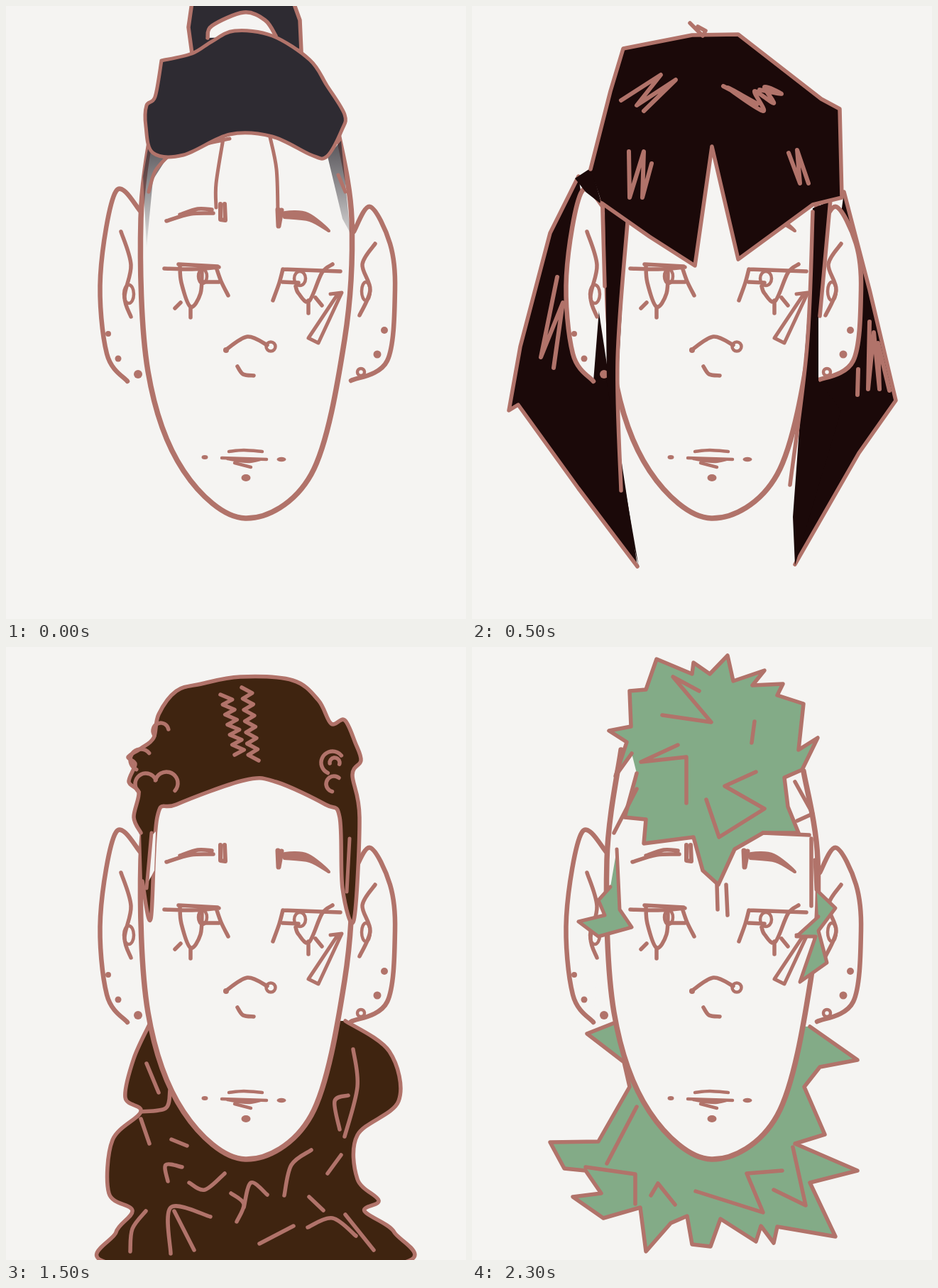
An HTML page with a canvas that plays this animation: 648x864 px, repeating every 2500 ms.

```html
<!DOCTYPE html>
<html lang="en">
<head>
<meta charset="utf-8">
<title>Five hairstyles</title>
<style>
html, body { margin: 0; width: 100%; height: 100%; overflow: hidden; background: #f5f4f2; }
canvas { display: block; }
</style>
</head>
<body>
<canvas width="648" height="864"></canvas>
<script>
const ctx = document.querySelector('canvas').getContext('2d');
const PAPER = '#f5f4f2', LINE = '#b1736a', HOLD = 500;

// Strokes are written as "x y x y ..." with "/" between separate strokes.
const parse = text => text.split('/').map(part => {
  const n = part.trim().split(/\s+/).map(Number);
  return n.flatMap((v, i) => i % 2 ? [] : [[v, n[i + 1]]]);
});

function trace(text, smooth) {
  const path = new Path2D();
  for (const p of parse(text)) {
    path.moveTo(...p[0]);
    for (let i = 1; i < p.length; i++) {
      const b = p[i - 1], c = p[i], a = p[i - 2] || b, d = p[i + 1] || c;
      if (smooth) path.bezierCurveTo(b[0] + (c[0] - a[0]) / 6, b[1] + (c[1] - a[1]) / 6,
        c[0] - (d[0] - b[0]) / 6, c[1] - (d[1] - b[1]) / 6, ...c);
      else path.lineTo(...c);
    }
  }
  return path;
}

function stroke(path, width = 5.5) {
  ctx.strokeStyle = LINE;
  ctx.lineWidth = width;
  ctx.stroke(path);
}
const curve = (text, width) => stroke(trace(text, true), width);
const angular = (text, width) => stroke(trace(text), width);

function fill(text, color, smooth) {
  ctx.fillStyle = color;
  ctx.fill(trace(text, smooth));
}

function shape(text, color, smooth, width) {
  fill(text, color, smooth);
  stroke(trace(text, smooth), width);
}

function dot(x, y, rx, ry = rx) {
  ctx.fillStyle = LINE;
  ctx.beginPath();
  ctx.ellipse(x, y, rx, ry, 0, 0, 7);
  ctx.fill();
}

function ring(x, y, rx, ry = rx) {
  const path = new Path2D();
  path.ellipse(x, y, rx, ry, 0, 0, 7);
  stroke(path, 4.5);
}

function curl(x, y, r, turn) {
  const path = new Path2D();
  path.arc(x, y, r, turn, turn + 3.6);
  stroke(path);
}

function zigzag(x, y, dx, dy, swing, turns) {
  const path = new Path2D();
  for (let i = 0; i <= turns; i++) {
    path.lineTo(x + dx * i / turns + (i % 2) * swing, y + dy * i / turns);
  }
  stroke(path);
}

const HEAD = '210 145 190 300 200 515 250 655 337 722 430 660 477 470 487 300 467 175';
const EARS = `190 290 155 261 133 380 142 490 171 529 /
  490 318 513 283 541 335 548 400 537 500 486 528`;

function face() {
  fill(EARS, PAPER, true);
  fill(HEAD, PAPER, true);
  curve(HEAD, 7.5);
  curve(EARS, 6.5);
  curve('162 318 176 365 167 410 176 438 / 520 335 502 364 513 400 498 436');
  ring(173, 406, 7, 13);
  ring(507, 402, 6, 13);
  dot(144, 462, 4); dot(158, 497, 4.5); dot(186, 519, 6);
  dot(533, 457, 5); dot(523, 491, 5.5); ring(500, 516, 5);

  // brows
  curve('226 303 260 293 292 292 / 245 294 270 286 290 287');
  angular('302 279 302 301 309 302 308 279', 6);
  angular('383 287 384 310 388 288', 7);
  shape('392 298 393 291 425 293 455 317 428 302 392 298', LINE, true, 4);

  // eyes
  curve(`223 370 262 371 300 368 / 243 364 298 367 / 245 365 247 390 260 424 274 405 276 372 /
    277 389 300 389 / 296 368 303 388 313 408 / 246 418 238 426 / 260 425 260 439`);
  curve(`390 371 471 374 / 390 371 385 390 376 415 / 390 389 412 390 /
    408 395 412 405 427 416 445 376 460 364 / 426 415 426 433 / 436 411 445 422`);
  ring(277, 381, 6, 10);
  ring(414, 384, 8, 10);
  angular('457 406 473 404 440 475 426 468 466 408', 5);

  // nose and mouth
  curve('309 485 340 466 368 478 / 326 508 334 519 349 521');
  dot(310, 485, 4);
  ring(373, 480, 6.5);
  curve('314 628 335 626 361 628 / 304 637 367 639 / 312 638 340 642 358 639 / 322 644 345 650', 4.5);
  dot(280, 636, 4.5, 3); dot(388, 639, 6.5, 3.2); dot(338, 665, 6.5, 5);
}

function shade(text) {
  const gradient = ctx.createLinearGradient(0, 190, 0, 340);
  ['cc', '73', '14'].forEach((alpha, i) => gradient.addColorStop(i / 2, '#2e2b32' + alpha));
  fill(text, gradient);
}

const topKnot = {
  color: '#2e2b32',
  front() {
    shade('202 190 228 212 207 245 198 340 193 240');
    shade('453 212 472 190 485 320 474 300');
    shape('262 -5 257 30 262 67 345 40 416 64 414 20 405 -5', this.color);
    shape('284 45 290 28 335 9 365 20 380 42', PAPER, true);
    curve(`306 187 296 250 296 284 / 372 185 381 230 383 290 /
      228 212 210 233 201 262 / 468 238 478 262 / 250 207 275 196 315 187`, 5);
    shape(`219 77 262 67 290 50 322 35 375 42 428 76 452 112 477 153 473 175 452 212 430 210
      375 184 315 181 250 210 207 207 197 170 198 140 210 128 219 77`, this.color, true, 5);
  }
};

const bob = {
  color: '#1b0909',
  back() {
    shape('150 240 110 320 68 480 52 570 65 562 150 680 233 790', this.color);
    shape('524 262 560 400 597 556 545 630 455 787', this.color);
  },
  front() {
    fill('187 280 218 305 206 520 210 683 235 791 190 532', this.color);
    fill('480 285 505 275 488 440 488 528 520 570 455 788 452 720 474 420', this.color);
    fill('183 280 160 262 145 243 168 228', this.color);
    curve(`183 255 187 395 / 219 305 205 500 210 683 /
      480 290 472 480 448 675 / 507 250 498 350 490 437`);
    shape(`167 230 195 120 213 60 310 41 375 40 492 131 518 145 521 270 480 280
      375 357 338 198 314 366 250 325 183 278`, this.color);
    angular('307 24 325 42 329 35 318 29');
    angular(`210 133 266 97 232 140 287 104 242 148 / 221 205 222 270 242 205 240 270 253 222 /
      446 207 462 250 458 203 474 250 / 120 382 97 495 128 418 115 510 / 544 512 543 548 /
      560 445 558 540 566 460 574 540 572 475 588 542`, 6);
    curve('354 113 402 138 360 115 410 148 398 120 425 137 412 114 436 124 405 118', 6);
  }
};

const spiky = {
  color: '#d2b19b',
  back() {
    shape('207 597 196 562 166 578 197 532', this.color);
    shape('476 535 509 595 466 571 473 598', this.color);
  },
  front() {
    shape('188 322 188 308 165 298 190 283', this.color);
    shape(`140 241 180 238 143 188 181 177 176 135 216 120 210 65 258 42 288 45 285 18 328 40 337 18
      335 52 387 30 390 65 406 77 460 88 470 152 523 170 510 228 545 227 524 242 521 262 494 288
      500 320 475 350 483 285 480 262 460 283 457 235 438 222 403 248 403 215 340 205 317 190
      347 274 300 192 250 230 248 200 216 240 213 270 180 285`, this.color);
    angular('487 340 500 350 488 362');
  }
};

const curly = {
  color: '#3f2410',
  back() {
    shape(`203 530 180 580 168 635 190 655 150 695 145 770 178 794 155 825 158 870 545 870 547 825
      505 795 525 780 495 750 495 688 553 640 540 570 478 527`, this.color, true);
    curve(`198 587 215 628 / 231 625 225 650 190 655 / 190 665 202 700 / 233 694 255 703 /
      228 753 225 730 248 733 / 258 755 280 765 308 742 / 392 773 402 730 430 709 / 453 742 472 716 /
      489 567 495 620 477 690 / 482 632 463 640 470 680`);
    curve(`317 770 335 785 325 810 / 335 790 345 755 368 772 / 197 795 178 820 175 852 /
      232 855 232 790 288 803 / 237 795 265 850 / 357 841 405 816 / 425 818 460 805 493 830 /
      427 775 447 794 / 478 800 518 850`);
  },
  front() {
    shape(`190 262 180 240 187 205 173 190 182 165 172 155 190 143 208 128 215 95 240 62 275 52 330 42
      404 47 440 75 458 108 477 103 492 135 500 160 488 180 498 240 490 385 474 340 470 240 450 222
      380 190 335 188 240 222 213 240 204 383 192 330`, this.color, true);
    fill('201 330 203 268 211 260 209 315', PAPER);
    curve('198 340 205 262 / 480 345 484 270', 5);
    curl(218, 118, 11, 2.5);
    curl(190, 159, 15, 2);
    curl(197, 193, 15, 2.3);
    curl(226, 192, 16, 3.4);
    curl(460, 163, 16, 2);
    curl(463, 163, 7, 3);
    curl(462, 193, 11, 1.8);
    zigzag(302, 67, 20, 85, 15, 12);
    zigzag(332, 57, 10, 103, 14, 13);
  }
};

const mohawk = {
  color: '#83ab87',
  back() {
    shape(`200 530 162 545 214 585 222 620 178 697 110 698 130 735 160 738 182 770 142 775 185 805
      237 790 245 852 280 812 303 802 310 842 336 845 350 806 400 838 407 816 425 840 430 817
      512 831 476 755 543 738 455 700 497 687 468 620 490 592 543 582 476 535`, this.color);
    angular(`232 648 190 728 / 160 733 230 743 230 785 / 315 767 410 797 387 742 437 738 /
      452 705 470 787 425 765 / 252 773 262 756 286 786`);
  },
  front() {
    shape(`225 150 202 182 218 134 193 118 224 112 222 62 245 60 260 17 310 38 312 22 335 38 360 12
      368 48 412 33 395 54 438 52 430 68 467 80 460 145 487 128 465 173 440 184 445 225 460 262
      410 262 370 285 347 335 325 315 312 268 242 277 245 243 215 240 232 178`, this.color);
    shape('204 285 208 370 225 395 178 408 150 387 187 378 178 357 195 338', this.color, false, 5);
    shape('483 300 485 342 512 368 488 400 500 445 462 472 484 408 457 408 488 380', this.color, false, 5);
    angular(`320 62 283 42 337 106 268 96 / 398 105 394 135 / 290 138 238 162 302 155 302 220 /
      400 176 356 196 412 228 348 268 330 215 / 232 200 200 262 / 455 190 480 235 458 245 /
      410 262 475 265 / 345 335 346 370 / 358 335 360 378 / 478 270 478 365`);
  }
};

const styles = [topKnot, bob, spiky, curly, mohawk];
ctx.lineCap = ctx.lineJoin = 'round';

function draw() {
  const elapsed = performance.now() - start;
  const style = styles[Math.floor(elapsed / HOLD) % styles.length];
  ctx.fillStyle = PAPER;
  ctx.fillRect(0, 0, 648, 864);
  style.back?.();
  face();
  style.front();
  requestAnimationFrame(draw);
}
const start = performance.now();
draw();
</script>
</body>
</html>
```
